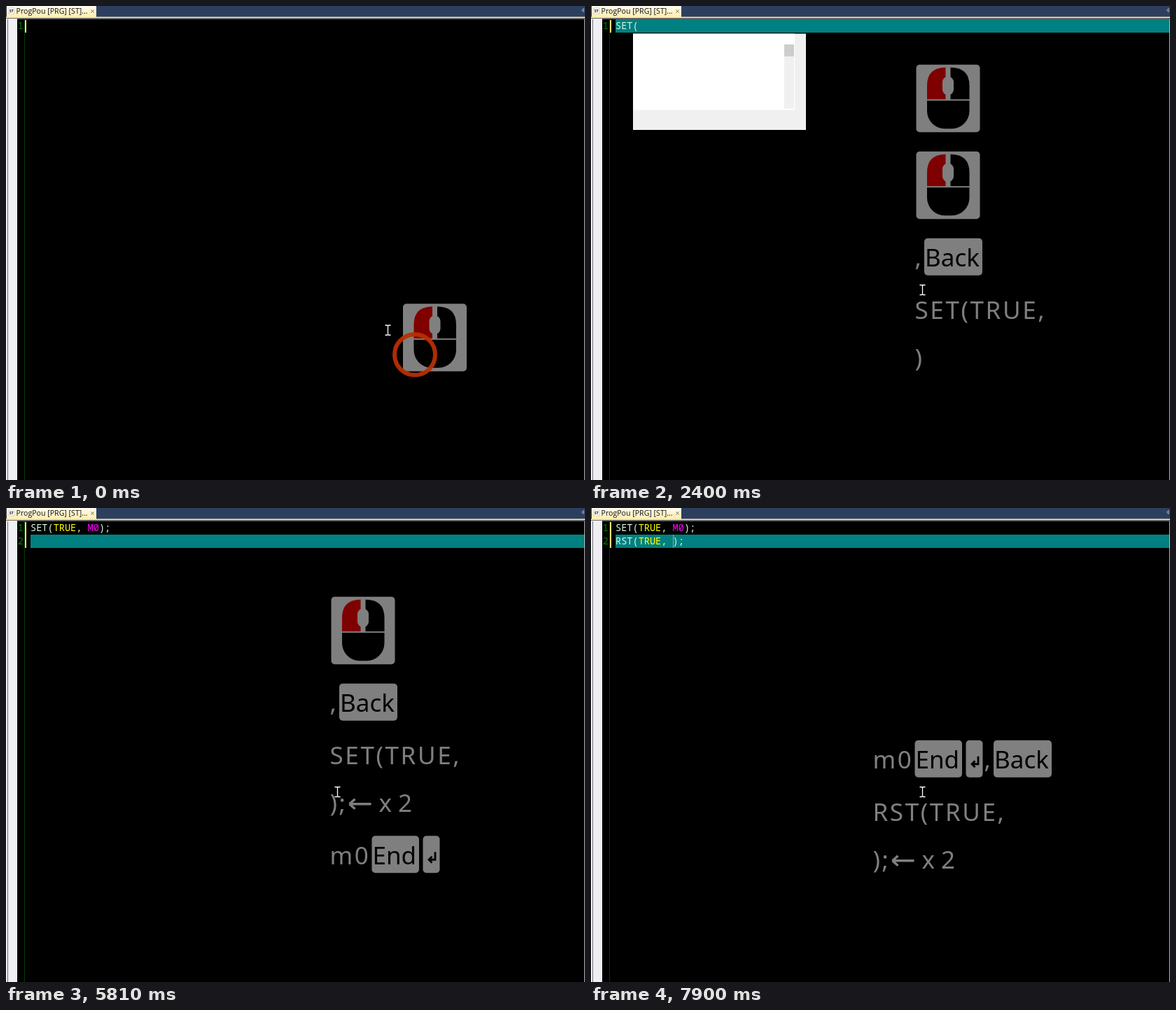
Recreate the animation shown at these times as an HTML page. Size 827 by 677 pixels, loop 8 s.

```html
<!DOCTYPE html>
<html lang="en">
<head>
<meta charset="utf-8">
<title>Structured text editor</title>
<style>
html, body { margin: 0; width: 100%; height: 100%; overflow: hidden; background: #000; }
svg { display: block; width: 827px; height: 677px; }
text { white-space: pre; }
.ui { font-family: "Open Sans", "Noto Sans", sans-serif; }
.code { font: 13.6px "Noto Sans Mono", monospace; fill: #d8f6de; }
.num { fill: #008000; }
.bool { fill: #ffff00; }
.dev { fill: #ff00ff; }
.key { font: 500 35px "Noto Sans", "Open Sans", sans-serif; }
.typed { letter-spacing: 2.6px; }
</style>
</head>
<body>
<svg viewBox="0 0 827 677" xmlns="http://www.w3.org/2000/svg">
  <defs>
    <linearGradient id="tab" x1="0" y1="0" x2="0" y2="1">
      <stop offset="0" stop-color="#fffcf0"/>
      <stop offset="1" stop-color="#ffebaa"/>
    </linearGradient>
    <g id="mouse">
      <rect x="-6.5" y="-6.5" width="104" height="109.5" rx="8"/>
      <rect width="91" height="96.5" rx="5" fill="#fff"/>
      <path d="M15.5 49.5V30Q15.5 4 42 4V49.5Z" fill="#f00"/>
      <path d="M76 49.5V30Q76 4 49 4V49.5Z"/>
      <rect x="37.5" y="17" width="16" height="26.5" rx="8" fill="#fff"/>
      <path d="M15.5 51.5H76V66A25 25.5 0 0 1 51 91.5H40.5A25 25.5 0 0 1 15.5 66Z"/>
    </g>
  </defs>
  <rect width="827" height="677"/>
  <rect width="827" height="16" fill="#2d3f5f"/>
  <rect x="1" width="128" height="17" fill="url(#tab)"/>
  <rect y="15.5" width="827" height="2" fill="#ffebaa"/>
  <rect y="17.5" width="827" height="1.5" fill="#5a5f68"/>
  <rect x="4" y="3" width="8" height="8" fill="#fff" stroke="#b8b8b8" stroke-width=".6"/>
  <text class="ui" x="5" y="9" font-size="5" font-weight="700">ST</text>
  <text class="ui" x="14.5" y="11" font-size="10.6" fill="#111">ProgPou [PRG] [ST]...</text>
  <path d="M121.5 5.5l4 4m0-4l-4 4" stroke="#6a5c38"/>
  <path d="M825 3.5v5l-2.5-2.5z" fill="none" stroke="#c8d0e0" stroke-width=".8"/>
  <rect y="18" width="16" height="659" fill="#f0eff3"/>
  <path d="M2.5 19V677" stroke="#6c6c70"/>
  <path d="M26.5 19V677" stroke="#003c00"/>
  <path d="M826.5 19V677" stroke="#b4b4b8"/>
  <g id="editor"></g>
  <g id="keys" opacity=".5"></g>
  <g id="pointer"></g>
</svg>
<script>
const LOOP = 8000, RIGHT = 658, FLOOR = 549.25;

// Horizontal advance of each keystroke token
const advance = {
  mouse: 91, ',': 11.5, '[Back]': 83, '[End]': 73, '[Enter]': 28, m0: 58,
  'SET(TRUE,': 193.5, 'SET(TR': 128, 'RST(TRUE,': 193.5, 'RST(TR': 128,
  ')': 14, ');': 26, left: 44, 'x 2': 50
};
const keyWidth = { '[Back]': 83, '[End]': 67.5, '[Enter]': 24 };

const mouse = ['mouse'], back = [',', '[Back]'];
const set = ['SET(TRUE,'], rst = ['RST(TRUE,'], close = [');', 'left', 'x 2'];
const enter = ['m0', '[End]', '[Enter]'], next = [...enter, ...back];

const HOME = [473.5, 405.5];
const LINE1 = 'SET(TRUE, M0);';

// Each step overrides part of the previous state
const steps = [
  [0, { rows: [mouse], lines: [''], active: 0, caret: 0, popup: 0,
        pointer: [545.5, 463], ring: [584, 498, 29, .95] }],
  [330, { pointer: HOME, ring: [479, 410, 32, .7] }],
  [680, { ring: null, active: 1, caret: 35 }],
  [1010, { rows: [mouse, mouse], ring: [471, 403, 28, .95] }],
  [1360, { ring: [471, 403, 32, .7], caret: 0 }],
  [1710, { ring: null }],
  [2040, { rows: [mouse, mouse, back, ['SET(TR']], lines: ['S'], caret: 43 }],
  [2400, { rows: [mouse, mouse, back, set, [')']], lines: ['SET('], caret: 0, popup: 60 }],
  [2750, { rows: [mouse, mouse, back, set, close], lines: ['SET(TRUE, );'], caret: 117, popup: 0 }],
  [4100, { rows: [mouse, mouse, back, set, close, ['m0']], lines: ['SET(TRUE, m0);'], caret: 0 }],
  [4430, { lines: [LINE1] }],
  [4780, { rows: [mouse, back, set, close, ['m0', '[End]']], caret: 149 }],
  [5130, { rows: [mouse, back, set, close, enter], lines: [LINE1, ''], active: 2, caret: 35 }],
  [5810, { caret: 0 }],
  [6140, { rows: [back, set, close, next, ['RST(TR']], lines: [LINE1, 'R'] }],
  [6560, { rows: [back, set, close, next, rst, close], lines: [LINE1, 'RST'], popup: 84 }],
  [6890, { lines: [LINE1, 'RST(TRUE, );'], popup: 0, caret: 117 }],
  [7210, { rows: [set, close, next, rst, close] }],
  [7570, { rows: [next, rst, close], caret: 0 }],
  [7900, { caret: 117 }]
];

let last = {};
const states = steps.map(([at, change]) => (last = { ...last, ...change, at }));

const rect = (x, y, w, h, fill, rx = 0) =>
  `<rect x="${x}" y="${y}" width="${w}" height="${h}" fill="${fill}" rx="${rx}"/>`;
const text = (x, y, cls, str) => `<text x="${x}" y="${y}" class="${cls}">${str}</text>`;
const lineTop = n => 19 + (n - 1) * 19;
const colour = s => s
  .replace('TRUE', '<tspan class="bool">TRUE</tspan>')
  .replace('M0', '<tspan class="dev">M0</tspan>');

function drawPopup(x, y) {
  return rect(x, y, 247, 137.5, '#f0f0f0') + rect(x, y, 231, 109, '#fff') +
    rect(x + 216, y + 15, 14, 92, '#f0f0f0') + rect(x + 216, y + 15.5, 14, 17, '#cdcdcd');
}

function drawEditor({ lines, active, caret, popup }) {
  let out = rect(27, 20, 2, lines.length * 19 - 1, '#f2e27a');
  if (active) out += rect(35, lineTop(active), 791, 19, '#008080');
  lines.forEach((line, i) => {
    const base = lineTop(i + 1) + 14;
    out += text(16.8, base, 'code num', i + 1) + text(35, base, 'code', colour(line));
  });
  if (caret) out += rect(caret, lineTop(active), 1, 19, '#88aaaa');
  if (popup) out += drawPopup(popup, lineTop(active) + 20.5);
  return out;
}

function drawToken(token, x, top, base) {
  if (token === 'mouse') return `<use href="#mouse" x="${x}" y="${top}"/>`;
  if (token === 'left') {
    return `<path d="M${x} ${base - 11.5}h31m-31 0l8-7m-8 7l8 7" fill="none" stroke="#fff" stroke-width="3.4"/>`;
  }
  if (!(token in keyWidth)) {
    return `<g fill="#fff">${text(x - 2, base, token === 'x 2' ? 'key' : 'key typed', token)}</g>`;
  }
  const box = rect(x, top, keyWidth[token], 53, '#fff', 5);
  if (token === '[Enter]') {
    return box + `<path d="M${x + 17.5} ${top + 23}v11h-9m4.5-4.5l-4.5 4.5l4.5 4.5" fill="none" stroke="#000" stroke-width="2.8"/>`;
  }
  return box + text(x + 1, top + 40.5, 'key', token.slice(1, -1));
}

function rowHeight(row) {
  if (row[0] === 'mouse') return 124;
  return row.some(t => t in keyWidth) ? 81 : 68.25;
}

function drawKeys({ rows }) {
  const width = row => row.reduce((sum, t) => sum + advance[t], 0);
  const left = RIGHT - Math.max(...rows.map(width));
  let top = FLOOR, out = '';
  for (const row of [...rows].reverse()) {
    const h = rowHeight(row), base = h === 81 ? 40.5 : 34.3;
    top -= h;
    let x = left;
    for (const token of row) {
      out += drawToken(token, x, top, top + base);
      x += advance[token];
    }
  }
  return out;
}

function drawPointer({ pointer: [x, y], ring }) {
  let out = '';
  if (ring) {
    const [cx, cy, r, alpha] = ring;
    out += `<circle cx="${cx}" cy="${cy}" r="${r}" fill="none" stroke="#b83000" stroke-width="6" opacity="${alpha}"/>`;
  }
  return out + `<path d="M${x - 4} ${y - 7}h3l1 1l1-1h3M${x} ${y - 6}v12M${x - 4} ${y + 7}h3l1-1l1 1h3" fill="none" stroke="#fff" stroke-width="1.3"/>`;
}

const layers = { editor: drawEditor, keys: drawKeys, pointer: drawPointer };
const start = performance.now();
let shown = null;

function frame(now) {
  const t = Math.max(0, now - start) % LOOP;
  const state = states.findLast(s => s.at <= t);
  if (state !== shown) {
    for (const id in layers) document.getElementById(id).innerHTML = layers[id](state);
    shown = state;
  }
  requestAnimationFrame(frame);
}
frame(start);
</script>
</body>
</html>
```
